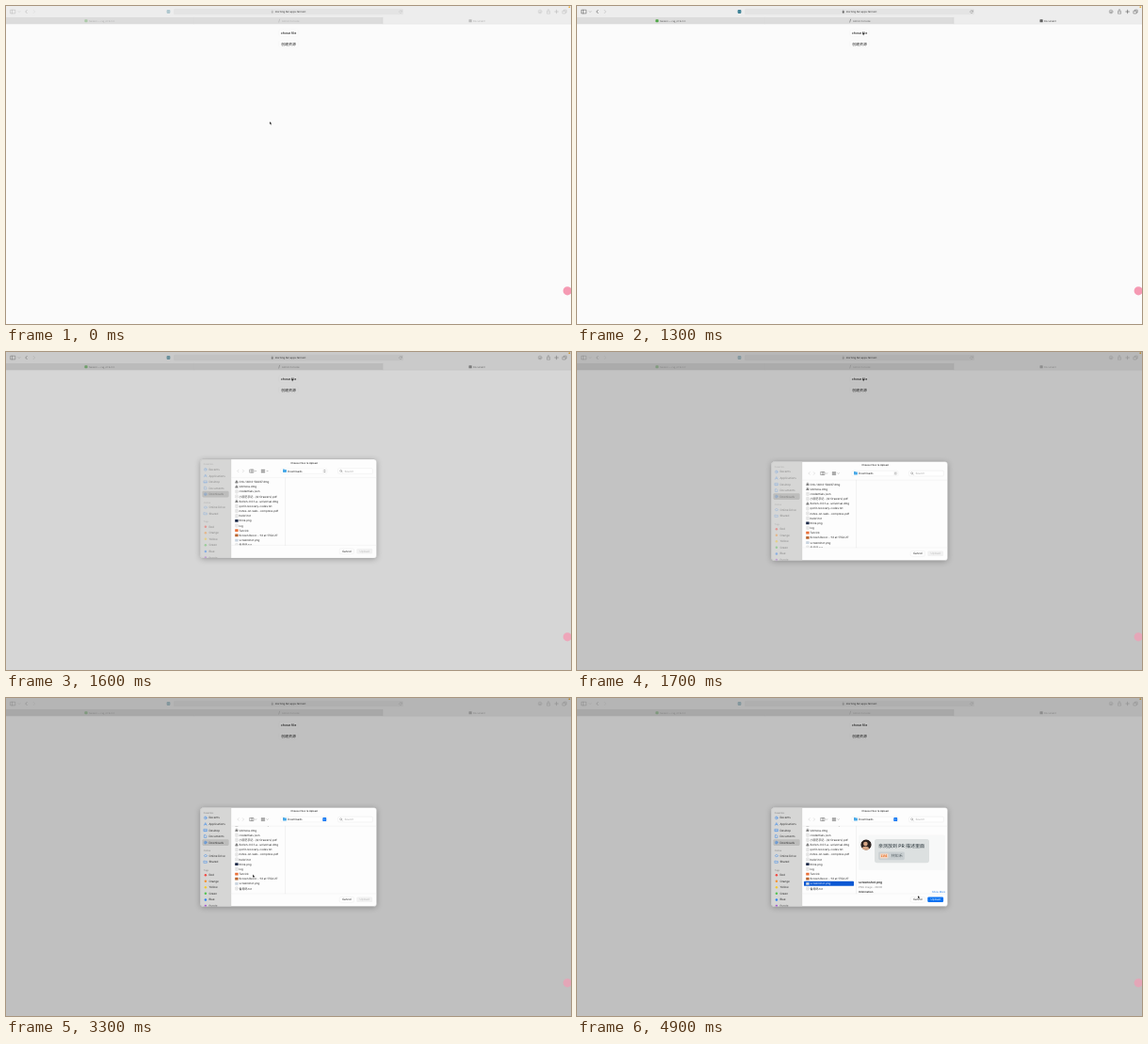
Write an HTML page that moves like this. It is 600 px wide and 338 px high and loops after 5 s.

```html
<!DOCTYPE html>
<html lang="zh-CN">
<head>
<meta charset="utf-8">
<title>Choose files</title>
<style>
html, body { margin: 0; width: 100%; height: 100%; overflow: hidden; background: #fbfbfb; }
svg { display: block; width: 100vw; height: 100vh; }
text { font-family: Inter, "Noto Sans CJK SC", "Noto Sans CJK", sans-serif; text-rendering: geometricPrecision; white-space: pre; }
</style>
</head>
<body>
<svg id="stage" viewBox="0 0 600 338" preserveAspectRatio="none"></svg>
<script>
const LOOP = 5000, STEP = 100, ROW = 5.17;

// ---- markup helpers ----
const text = (x, y, s, size, fill = '#2b2b2b', extra = '') =>
  `<text x="${x}" y="${y + size * 0.36}" font-size="${size}" fill="${fill}" ${extra}>${s}</text>`;
const rect = (x, y, w, h, fill, rx = 0, extra = '') =>
  `<rect x="${x}" y="${y}" width="${w}" height="${h}" rx="${rx}" fill="${fill}" ${extra}/>`;
const dot = (x, y, r, fill) => `<circle cx="${x}" cy="${y}" r="${r}" fill="${fill}"/>`;
const line = (d, color = '#444', w = 0.5) =>
  `<path d="${d}" fill="none" stroke="${color}" stroke-width="${w}" stroke-linecap="round" stroke-linejoin="round"/>`;
const group = (id, body, extra = '') => `<g id="${id}" ${extra}>${body}</g>`;
const mid = 'text-anchor="middle"', end = 'text-anchor="end"', bold = 'font-weight="600"';
const medium = 'font-weight="500"';

// ---- browser window ----
function browser() {
  const bar = rect(0, 0, 600, 19.3, '#ededed')
    + rect(0, 12, 199.3, 7, '#dcdcdc') + rect(199.7, 12, 200.3, 7, '#dcdcdc')
    + line('M199.5 12.3V18.8M400 12.3V18.8', '#cdcdcd', 0.4)
    + line('M0 19.2H600', '#d6d6d6', 0.3)
    + rect(178, 2.8, 244, 6.5, '#e4e4e4', 1.6);
  const icons = line('M5 4.2H9.8V7.9H5ZM6.6 4.2V7.9')
    + line('M13 5.6L14 6.6L15 5.6', '#777', 0.4)
    + line('M22.2 4.4L20.7 6L22.2 7.6', '#333', 0.6)
    + line('M29.2 4.4L30.7 6L29.2 7.6', '#b5b5b5', 0.6)
    + rect(170.6, 4.1, 3.8, 3.8, '#367d92', 0.8)
    + rect(281.8, 5.6, 1.9, 1.8, '#555', 0.3) + line('M282.2 5.6V4.9Q282.8 4.1 283.3 4.9V5.6', '#555', 0.35)
    + line('M420.2 5.5A1.4 1.4 0 1 0 420.3 6.5M420.4 4.7V5.6H419.5', '#666', 0.35)
    + line('M569 6A1.9 1.9 0 1 1 565.2 6A1.9 1.9 0 1 1 569 6M567.1 5V7M566.4 6.4L567.1 7L567.8 6.4', '#555', 0.4)
    + line('M575 5.5H574.5V8.2H577.6V5.5H577.1M576 6.8V3.7M575.2 4.5L576 3.7L576.8 4.5', '#444', 0.4)
    + line('M582.8 6H586.4M584.6 4.2V7.8', '#333', 0.5)
    + line('M591.3 5.2H594.1V8H591.3ZM592.4 5V4.1H595.2V6.9H594.3', '#444', 0.45);
  const tabs = rect(83.4, 14.2, 3.2, 3, '#45a33c', 0.7)
    + text(88, 15.7, 'NodeUI — rag_v2.16.2.0', 2.45, '#555')
    + line('M290.6 14.2L289.7 17.1', '#555', 0.55)
    + text(293, 15.7, 'Admin Console', 2.6, '#555')
    + rect(491.5, 14.2, 3.2, 3, '#555', 0.5)
    + text(496, 15.7, 'Document', 2.6, '#222');
  const button = (y, label, size) =>
    rect(290, y - 3.6, 20, 7.2, '#fdfdfd', 1.4, 'stroke="#f0f0f0" stroke-width=".35"')
    + text(300, y, label, size, '#222', mid + ' ' + medium);
  return rect(0, 0, 600, 338, '#fbfbfb') + bar
    + group('icons', icons + tabs)
    + text(302, 6.1, 'morning.fen.apps.fen.test', 2.7, '#333', mid)
    + dot(598.3, 1.2, 0.9, '#f0b445')
    + button(28.5, 'chose file', 3.55) + button(40.2, '创建资源', 3.9);
}

// ---- dialog parts ----
function sidebar() {
  const blue = '#1978ec';
  const shapes = [
    (y) => line(`M213.2 ${y}a1.4 1.4 0 1 1 -2.8 0a1.4 1.4 0 1 1 2.8 0M211.8 ${y - 0.8}v.8h.6`, blue, 0.4),
    (y) => line(`M210.5 ${y + 1.3}L211.8 ${y - 1.4}L213.1 ${y + 1.3}M211 ${y + 0.4}h1.7`, blue, 0.4),
    (y) => line(`M210.3 ${y - 1.1}h3v2.2h-3zM210.3 ${y + 0.5}h3`, blue, 0.4),
    (y) => line(`M210.8 ${y - 1.4}h1.3l.8 .8v2h-2.1z`, blue, 0.4),
    (y) => line(`M213.2 ${y}a1.4 1.4 0 1 1 -2.8 0a1.4 1.4 0 1 1 2.8 0M211.8 ${y - 0.7}v1.3m-.5 -.5l.5 .5l.5 -.5`, blue, 0.4),
    (y) => line(`M210.9 ${y + 0.9}a.8 .8 0 0 1 .1 -1.5a1 1 0 0 1 1.8 .1a.7 .7 0 0 1 0 1.4z`, blue, 0.4),
    (y) => line(`M210.3 ${y - 0.9}h1l.4 .4h1.6v1.7h-3z`, blue, 0.4)
  ];
  const head = (y, s) => text(209.8, y, s, 2.4, '#8a8a8a', medium);
  const places = ['Recents', 'Applications', 'Desktop', 'Documents', 'Downloads', 'Online Drive', 'Shared'];
  const tags = [['Red', '#f24a45'], ['Orange', '#f59334'], ['Yellow', '#f3c833'],
    ['Green', '#55c353'], ['Blue', '#2f83f2'], ['Purple', '#a75bd2']];
  let s = head(122, 'Favorites') + head(162.2, 'Online') + head(182.9, 'Tags');
  places.forEach((name, i) => {
    const y = i < 5 ? 127.4 + 6.55 * i : 167.6 + 6.5 * (i - 5);
    s += shapes[i](y) + text(215.4, y, name, 3);
  });
  tags.forEach(([name, color], i) => {
    const y = 188.2 + 6.55 * i;
    s += dot(211.9, y, 1.25, color) + text(215.4, y, name, 3);
  });
  return rect(206, 116, 33, 106, '#d6d6d5')
    + rect(208.4, 150.2, 28.2, 6.7, '#bdbdbc', 1.3)
    + group('places', s) + line('M239 116V222', '#cfcfcf', 0.35);
}

const files = [
  ['Orb-1.60.0-54437.dmg', 'disk'], ['Velmora.dmg', 'disk'], ['credentials.json', 'page'],
  ['小园艺手记…(Q-Drawers).pdf', 'page'], ['Sorlen-0.0.1-a…universal.dmg', 'disk'],
  ['qorlit-recovery-codes.txt', 'page'], ['notes-on-web…compress.pdf', 'page'], ['hello1.txt', 'page'],
  ['think.png', '#1c2a48'], ['log', 'page'], ['Tarvick', '#e9713a'],
  ['Screen Recor…-12 at 17.54.27', '#b9652f'], ['screenshot.png', '#c9d4df'], ['备用码.txt', 'page']
];
const PICK = 12;

function fileIcon(kind, y) {
  if (kind === 'disk') return rect(243.3, y - 0.2, 3.2, 1.6, '#8d8d8d', 0.4) + line(`M244.9 ${y - 1.5}v1.5m-.6 -.6l.6 .6l.6 -.6`, '#444', 0.5);
  if (kind === 'page') return rect(243.7, y - 1.6, 2.5, 3.2, '#fafafa', 0.2, 'stroke="#b5b5b5" stroke-width=".3"')
    + line(`M244.3 ${y - 0.4}h1.2m-1.2 .8h1.2`, '#b5b5b5', 0.25);
  return rect(243.2, y - 1.4, 3.4, 2.8, kind, 0.3);
}

function list() {
  let s = rect(241, 140.4 + ROW * PICK - 2.6, 53, 5.2, '#0a57d3', 0.9, 'id="pick"');
  files.forEach(([name, kind], i) => {
    const y = 140.5 + ROW * i;
    s += fileIcon(kind, y) + text(247.6, y, name, 2.95, '#222', i === PICK ? 'id="picked"' : '');
  });
  return `<g clip-path="url(#listBox)">${group('rows', s)}</g>`;
}

function toolbar() {
  return text(316.5, 120.4, 'Choose Files to Upload', 2.58, '#333', mid + ' ' + medium)
    + line('M247 127.7L245.8 129L247 130.3M251.4 127.7L252.6 129L251.4 130.3', '#c4c4c4', 0.45)
    + line('M259 127.5H263V130.6H259ZM260.3 127.5V130.6M261.7 127.5V130.6', '#555', 0.4)
    + line('M264.5 128.8L265.1 129.4L265.7 128.8M277 128.8L277.6 129.4L278.2 128.8', '#666', 0.4)
    + line('M271.6 127.6h1v1h-1zM273.7 127.6h1v1h-1zM271.6 129.6h1v1h-1zM273.7 129.6h1v1h-1z', '#555', 0.5)
    + rect(291.8, 126.3, 49.2, 5.5, '#fff', 1.2, 'stroke="#e2e2e2" stroke-width=".3"')
    + rect(294, 127.4, 3.9, 3.1, '#48a9e8', 0.4) + rect(294, 127, 1.8, 1, '#48a9e8', 0.3)
    + text(299.1, 129.1, 'Downloads', 2.95, '#222')
    + rect(336.3, 127, 3.9, 4.1, '#0a72f2', 0.9, 'id="stepper"')
    + group('arrows', '<path d="M337.6 128.6L338.25 127.9L338.9 128.6M337.6 129.5L338.25 130.2L338.9 129.5" fill="none" stroke-width=".4"/>')
    + rect(352.6, 126.2, 36.8, 5.7, '#fff', 1.2, 'stroke="#dedede" stroke-width=".3"')
    + line('M356.6 128.8a1 1 0 1 1 -2 0a1 1 0 1 1 2 0M356.4 129.6L357.1 130.4', '#777', 0.4)
    + text(359.4, 129.1, 'Search', 2.95, '#aaa');
}

function preview() {
  const card = rect(299, 145.6, 92, 37.5, '#f7f8f8', 1.5)
    + rect(316, 150, 58, 25.2, '#dce0e0', 2.6)
    + `<g clip-path="url(#face)">${dot(307, 156, 5.8, '#2e2522') + dot(306.4, 155, 2.3, '#d6a685')
      + '<ellipse cx="306.4" cy="161.5" rx="4.2" ry="3.8" fill="#d6a685"/>'}</g>`
    + text(320, 157.2, '亲测放到 PR 描述里面', 5, '#263238', medium)
    + rect(320.2, 163.4, 27.6, 8.8, '#c9cfd1', 1.4)
    + rect(321.8, 165.2, 8.6, 5.2, '#f4d7c3', 0.8)
    + text(326.1, 167.9, 'LV4', 3.5, '#e96a1e', mid + ' font-weight="700"')
    + text(333.5, 167.9, '林知禾', 4.1, '#5e686c');
  return card + text(299, 196, 'screenshot.png', 3.3, '#222', bold)
    + text(299, 200.6, 'PNG image - 28 KB', 2.75, '#888')
    + text(299, 206, 'Information', 2.75, '#222', bold)
    + text(391, 206, 'Show More', 2.6, '#1978ec', end);
}

function dialog() {
  const inner = rect(206, 116, 188, 106, '#fdfdfd') + sidebar() + toolbar()
    + line('M239 136.2H394M239 207.9H394', '#e4e4e4', 0.35)
    + line('M296.6 136.2V207.9', '#dedede', 0.4)
    + list() + group('preview', preview())
    + rect(354.2, 211.6, 15.2, 5.4, '#fff', 1.2, 'stroke="#dcdcdc" stroke-width=".3"')
    + text(361.8, 214.3, 'Cancel', 3, '#222', mid)
    + rect(372.3, 211.6, 16.8, 5.4, '#f2f2f2', 1.2, 'id="upBox"')
    + text(380.7, 214.3, 'Upload', 3, '#bbb', mid + ' id="upText"');
  return rect(206.4, 117.4, 187.2, 105.4, '#000', 3.2, 'opacity=".28" filter="url(#soft)"')
    + `<g clip-path="url(#panel)">${inner}</g>`
    + rect(206.4, 116.4, 187.2, 105.2, 'none', 3.2, 'stroke="#999" stroke-opacity=".6" stroke-width=".35"');
}

const stage = document.getElementById('stage');
stage.innerHTML = `<defs>
  <filter id="soft" x="-20%" y="-20%" width="140%" height="150%"><feGaussianBlur stdDeviation="3"/></filter>
  <clipPath id="panel">${rect(206.4, 116.4, 187.2, 105.2, '#000', 3.2)}</clipPath>
  <clipPath id="listBox">${rect(239, 136.4, 57.5, 71.3, '#000')}</clipPath>
  <clipPath id="face">${dot(307, 156, 5.8, '#000')}</clipPath>
</defs>` + browser()
  + rect(0, 0, 600, 338, '#000', 0, 'id="shade"')
  + group('badge', dot(596.2, 302.8, 4.6, '#f59ab3'))
  + group('dialog', dialog())
  + group('cursor', '<path d="M0 0V3.2L.75 2.55L1.25 3.7L1.8 3.45L1.3 2.35H2.3Z" fill="#000" stroke="#fff" stroke-width=".25"/>');

const el = {};
stage.querySelectorAll('[id]').forEach((n) => { el[n.id] = n; });
const set = (id, attrs) => {
  for (const k in attrs) el[id].setAttribute(k, attrs[k]);
};

// ---- motion ----
const linear = (u) => u;
const smooth = (u) => u * u * (3 - 2 * u);
function track(keys, t, ease = linear) {
  if (t <= keys[0][0]) return keys[0].slice(1);
  for (let i = 1; i < keys.length; i++) {
    const a = keys[i - 1], b = keys[i];
    if (t <= b[0]) {
      const u = ease((t - a[0]) / (b[0] - a[0]));
      return a.slice(1).map((v, k) => v + (b[k + 1] - v) * u);
    }
  }
  return keys[keys.length - 1].slice(1);
}

const pointer = [[0, 280, 122.8], [600, 288, 80], [900, 288, 80], [1300, 303.3, 27.6],
  [2100, 303.3, 27.6], [2400, 268, 172], [2900, 268, 172], [3300, 262, 187.6],
  [3500, 262, 187.6], [3800, 259, 196], [4100, 259, 196], [4700, 360.5, 211.4], [4900, 362, 210]];
const shade = [[1400, 0], [1500, 0.08], [1600, 0.15], [1700, 0.225], [1800, 0.235]];
const drop = [[1500, -6, 0.8], [1600, -2.5, 1], [1700, 0, 1]];
const chrome = [[600, 0.32], [800, 1], [1500, 0.9], [1600, 0.6], [1700, 0.35]];
const scroll = [[2500, 0], [2700, -ROW]];

function draw(t) {
  const [x, y] = track(pointer, t, smooth);
  const [dim] = track(shade, t);
  const [dy, fade] = track(drop, t);
  const active = t >= 1800, chosen = t >= 3800;
  set('cursor', { transform: `translate(${x} ${y})` });
  set('shade', { opacity: dim });
  set('badge', { opacity: 1 - dim * 1.4 });
  set('icons', { opacity: track(chrome, t)[0] });
  set('dialog', { transform: `translate(0 ${dy})`, opacity: t < 1500 ? 0 : fade });
  set('places', { opacity: active ? 1 : 0.45 });
  set('stepper', { fill: active ? '#0a72f2' : '#f1f1f1' });
  set('arrows', { stroke: active ? '#fff' : '#333' });
  set('rows', { transform: `translate(0 ${track(scroll, t)[0]})` });
  set('pick', { opacity: chosen ? 1 : 0 });
  set('picked', { fill: chosen ? '#fff' : '#222' });
  set('preview', { opacity: t >= 4000 ? 1 : 0 });
  set('upBox', { fill: chosen ? '#0a72f2' : '#f2f2f2' });
  set('upText', { fill: chosen ? '#fff' : '#bbb' });
}

const start = performance.now();
function tick() {
  const t = (performance.now() - start) % LOOP;
  draw(Math.floor(t / STEP) * STEP);
  requestAnimationFrame(tick);
}
draw(0);
requestAnimationFrame(tick);
</script>
</body>
</html>
```
